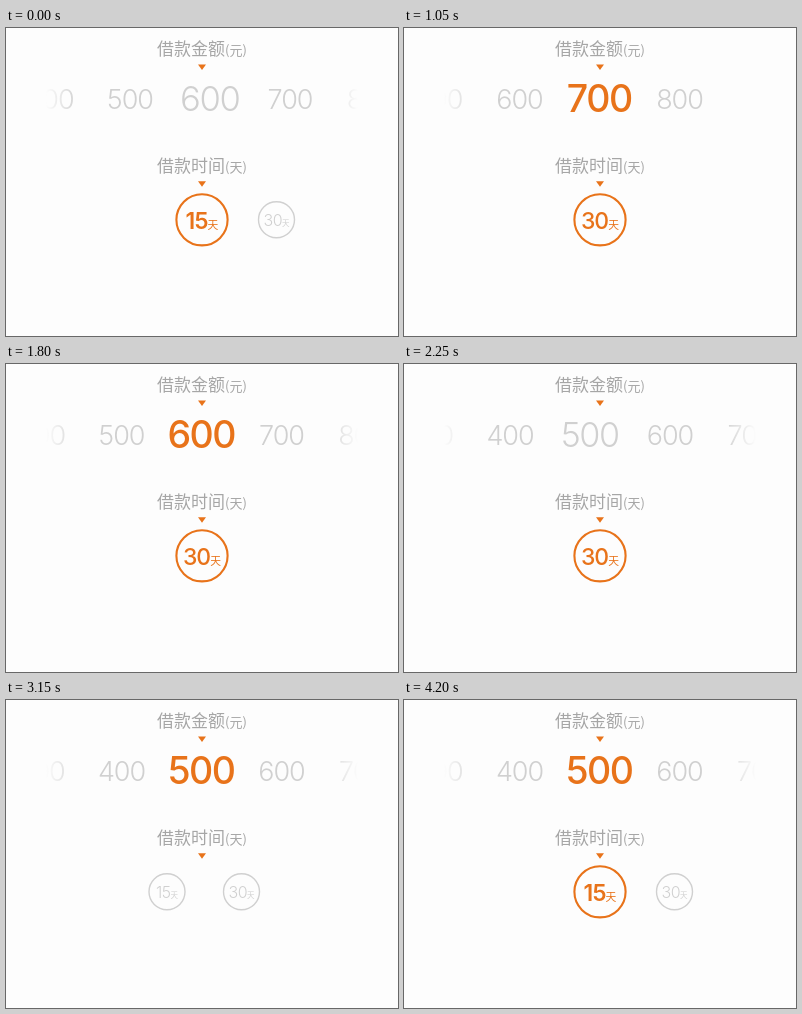
An HTML page for the animation above (8.2 s loop, 392x308 px).

```html
<!DOCTYPE html>
<html lang="zh-CN">
<head>
<meta charset="utf-8">
<style>
  html, body { margin: 0; width: 100%; height: 100%; overflow: hidden; background: #fdfdfd; }
  svg { display: block; width: 392px; height: 308px; }
  text { text-anchor: middle; font-family: Inter, "Noto Sans", sans-serif; font-optical-sizing: none; }
  .cjk { font-family: "Noto Sans CJK SC", "Noto Sans CJK", sans-serif; font-weight: 400; }
  .title { font-size: 17px; fill: #a6a6a6; text-anchor: start; }
  .title tspan { font-size: 13px; }
  .unit { font-weight: 300; }
  .arrow { fill: #e8731a; }
</style>
</head>
<body>
<svg viewBox="0 0 392 308">
  <defs>
    <linearGradient id="fade" gradientUnits="userSpaceOnUse" x1="40" x2="352" y1="0" y2="0">
      <stop offset="0" stop-color="#000"/>
      <stop offset=".1" stop-color="#fff"/>
      <stop offset=".9" stop-color="#fff"/>
      <stop offset="1" stop-color="#000"/>
    </linearGradient>
    <mask id="window" maskUnits="userSpaceOnUse" x="40" y="50" width="312" height="42" style="mask-type:luminance">
      <rect x="40" y="50" width="312" height="42" fill="url(#fade)"/>
    </mask>
  </defs>
  <text class="title cjk" x="151" y="26.6">借款金额<tspan>(元)</tspan></text>
  <path class="arrow" d="M192 36.6h8l-4 5.4z"/>
  <g id="amounts" mask="url(#window)"></g>
  <text class="title cjk" x="151" y="143.6">借款时间<tspan>(天)</tspan></text>
  <path class="arrow" d="M192 153.3h8l-4 5.4z"/>
  <g id="days"></g>
</svg>
<script>
const LOOP = 8200, CENTER = 196, REACH = 25;
const AMOUNT_Y = 70.7, AMOUNT_GAP = 80;
const DAY_Y = 191.8, DAY_GAP = 74.5;
const ORANGE = '#e8731a', GRAY = '#d0d0d0';
const TRACKING = -0.04; // em

// Stepped [time, scroll in px]; zero puts the first choice in the middle.
const amountScroll = [[0, 71.5], [150, 80], [600, 105], [750, 153.5], [900, 160],
  [1350, 150], [1500, 84.5], [1800, 80], [2100, 45], [2250, 9.5], [2400, 0]];
const dayScroll = [[0, 0], [3150, 35], [3300, 63.5], [3450, 74.5], [4050, 13], [4200, 0]];

const valueAt = (steps, t) => steps.filter(([start]) => start <= t).pop()[1];
const closeness = x => Math.max(0, 1 - Math.abs(x - CENTER) / REACH);

// Text centred on (x, y); half the trailing tracking is taken back.
const label = (x, y, size, weight, color, content) =>
  `<text x="${x + size * TRACKING / 2}" y="${y + size * 0.364}" font-size="${size}"
    letter-spacing="${size * TRACKING}" font-weight="${weight}" fill="${color}">${content}</text>`;

function amount(value, scroll) {
  const x = CENTER + (value - 500) / 100 * AMOUNT_GAP - scroll;
  const near = closeness(x), chosen = near === 1;
  const size = chosen ? 37.5 : 27 + 11.5 * near;
  return label(x, AMOUNT_Y, size, chosen ? 500 : 300, chosen ? ORANGE : GRAY, value);
}

function day(value, x) {
  const near = closeness(x), chosen = near === 1;
  const radius = 18 + 7.6 * near, size = 16 + 7 * near;
  const color = chosen ? ORANGE : GRAY;
  const weight = chosen ? (value === 15 ? 600 : 500) : 300;
  const unit = `<tspan class="cjk unit" font-size="${size * 0.47}">天</tspan>`;
  return `<circle cx="${x}" cy="${DAY_Y}" r="${radius}" fill="none"
      stroke="${color}" stroke-width="${chosen ? 2.1 : 1.4}"/>`
    + label(x, DAY_Y + 0.4, size, weight, color, value + unit);
}

const amounts = document.getElementById('amounts');
const days = document.getElementById('days');
let shown = '';

function render(t) {
  const money = valueAt(amountScroll, t), time = valueAt(dayScroll, t);
  const longOnly = t >= 150 && t < 2400; // larger sums offer only 30 days
  const state = [money, time, longOnly].join();
  if (state === shown) return;
  shown = state;
  amounts.innerHTML = [300, 400, 500, 600, 700, 800].map(v => amount(v, money)).join('');
  days.innerHTML = longOnly
    ? day(30, CENTER)
    : day(15, CENTER - time) + day(30, CENTER + DAY_GAP - time);
}

const origin = performance.now();
function tick() {
  render((performance.now() - origin) % LOOP);
  requestAnimationFrame(tick);
}
tick();
</script>
</body>
</html>
```
